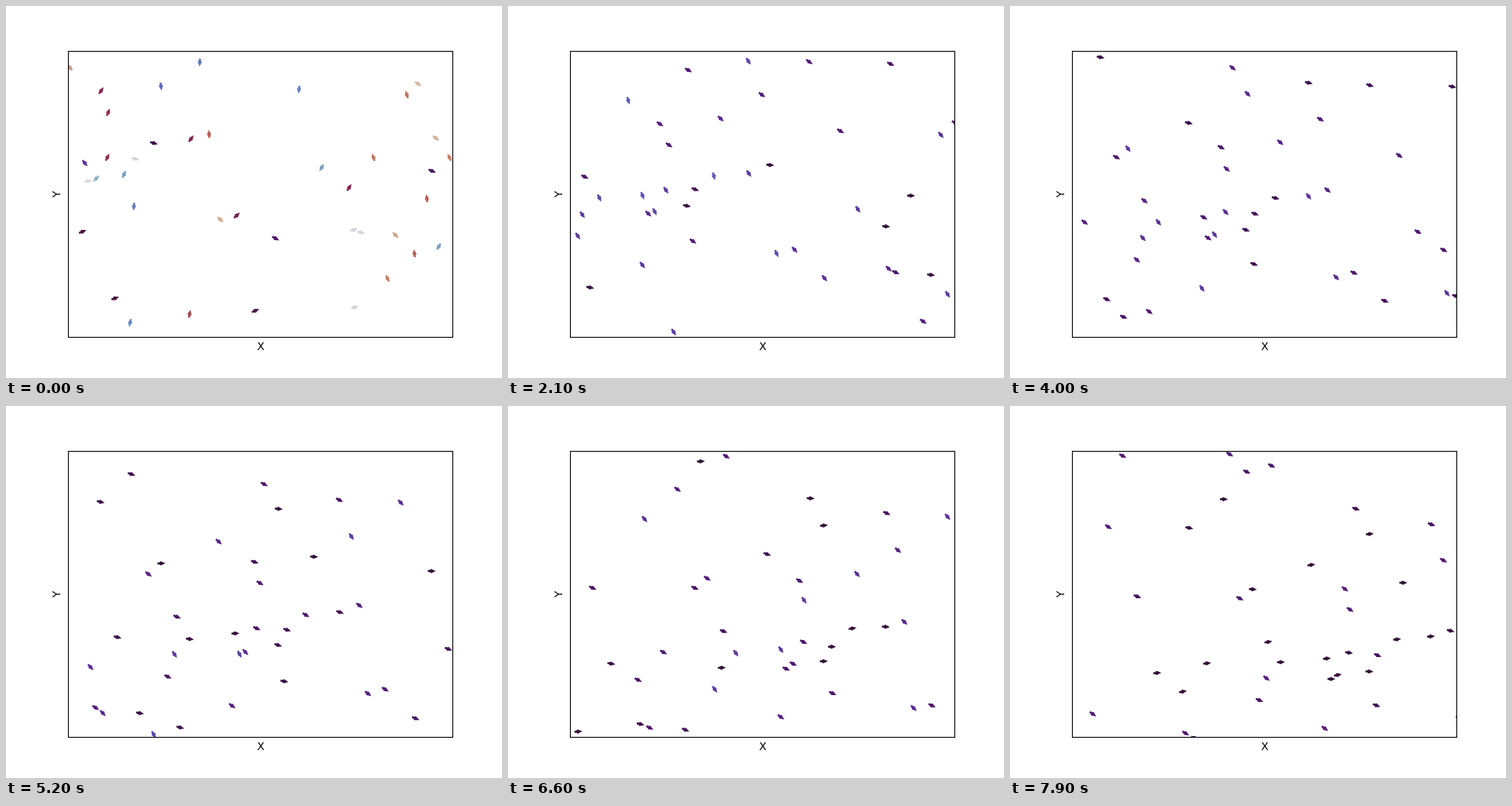
A matplotlib script for the animation above (8 s loop, 640 px wide and 480 px high).

```python
import numpy as np
import matplotlib.pyplot as plt
from matplotlib.animation import FuncAnimation

FRAMES = 80
ORIGIN = np.array([80, 57.6])
SIZE = np.array([496, 369.6])
SPEED = 0.00944   # share of the box covered per step
NOISE = 0.55      # half-width of the heading jitter, radians
LENGTH = 10.3     # arrow length in pixels

# Initial state of the flock, in stage pixels.
START = np.array([
    (82, 79), (123, 109), (132, 137), (200, 104), (250, 73),
    (378, 108), (531, 100), (517, 114), (554, 170), (572, 195),
    (474, 195), (550, 213), (543, 248), (407, 209), (443, 234),
    (448, 289), (457, 292), (502, 295), (558, 311), (527, 319),
    (492, 351), (449, 389), (322, 393), (348, 300), (298, 270),
    (276, 275), (237, 397), (160, 409), (141, 377), (99, 291),
    (105, 226), (116, 223), (102, 203), (152, 218), (165, 259),
    (131, 195), (166, 197), (191, 177), (239, 171), (262, 165)])


def unit(theta):
    """Direction vectors with y pointing down the stage."""
    return np.stack([np.cos(theta), -np.sin(theta)], axis=-1)


def flock_headings(rng):
    """Random at first, then the local mean direction plus jitter."""
    step = np.arange(FRAMES)[:, None]
    mean = np.interp(step, [0, 15, 31, 46, 60, 79],
                     [-.52, -.74, -.43, -.58, -.42, -.24])
    # The right half starts out leftwards and swings round to the rest.
    right = 1 / (1 + np.exp((345 - START[:, 0]) / 30))
    swing = 1.7 * np.clip(1 - (step - 1) / 9, 0, 1) * right
    # Jitter cancels over ten steps, so nobody strays from the flock.
    jitter = rng.uniform(-NOISE, NOISE, (FRAMES // 10, 10, len(START)))
    jitter -= jitter.mean(axis=1, keepdims=True)
    theta = mean - swing + jitter.reshape(FRAMES, -1)
    theta[0] = rng.uniform(-np.pi, np.pi, len(START))
    return theta


def arrow_tails(theta):
    """Integrate the headings inside a periodic box."""
    steps = SPEED * SIZE * unit(theta)
    steps[0] = 0
    tails = START + steps.cumsum(axis=0) - LENGTH / 2 * unit(theta)
    return (tails - ORIGIN) % SIZE + ORIGIN


heading = flock_headings(np.random.default_rng(7))
tails = arrow_tails(heading)

fig, ax = plt.subplots(figsize=(6.4, 4.8), dpi=100)
left, top = ORIGIN
right, bottom = ORIGIN + SIZE
ax.set(xlim=(left, right), ylim=(bottom, top), xticks=[], yticks=[],
       xlabel="X", ylabel="Y")
birds = ax.quiver(*tails[0].T, np.cos(heading[0]), np.sin(heading[0]),
                  heading[0], cmap="twilight", clim=(-np.pi, np.pi),
                  scale=SIZE[0] / LENGTH, width=0.0052, headwidth=2.1,
                  headlength=2.3, headaxislength=3.2)


def update(i):
    birds.set_offsets(tails[i])
    birds.set_UVC(np.cos(heading[i]), np.sin(heading[i]), heading[i])
    return birds,


anim = FuncAnimation(fig, update, frames=FRAMES, interval=100,
                     repeat=True, repeat_delay=0)
plt.show()
```
